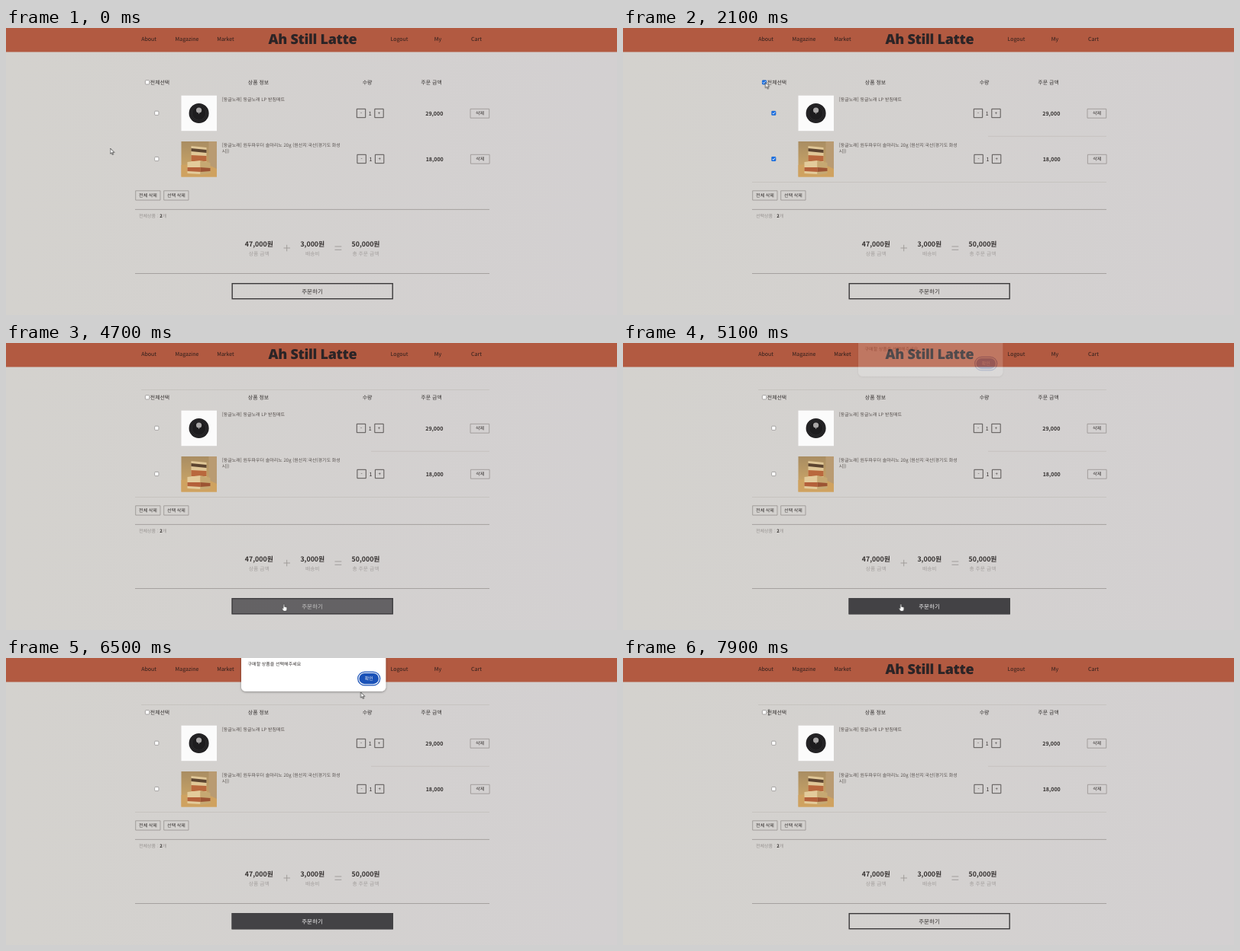
Write an HTML page that moves like this. It is 800x377 px and loops after 8000 ms.

```html
<!DOCTYPE html>
<html lang="ko">
<head>
<meta charset="utf-8">
<title>Cart</title>
<style>
html, body { margin: 0; width: 100%; height: 100%; overflow: hidden; background: #d4d1cf; }
svg { display: block; width: 800px; height: 377px; }
text {
  font: 400 6px "Noto Sans CJK KR", "Noto Sans CJK JP", "Noto Sans", sans-serif;
  fill: #34302f; text-rendering: geometricPrecision; white-space: pre;
}
.mid text, text.mid { text-anchor: middle; }
.nav text { font-size: 7px; fill: #2b1d1b; }
text.brand {
  font: 800 18px "Open Sans", Roboto, sans-serif;
  font-stretch: 75%; letter-spacing: -.3px; fill: #2b2426;
}
.head text { font-size: 6.9px; font-weight: 500; }
.name text { fill: #57514e; }
.price text { font-size: 7px; font-weight: 700; }
.sum text { font-size: 8.8px; font-weight: 700; }
.sub text { font-size: 6.8px; fill: #a39f9d; }
.count text { fill: #989492; }
.count .num { fill: #34302f; font-weight: 700; }
text.order { font-size: 7.5px; font-weight: 500; }
.white { fill: #f4f3f4 !important; }
.thin { fill: none; stroke: #9d9997; stroke-width: .9; }
.step { fill: none; stroke: #4b4746; stroke-width: .9; }

.checked, .picked, .all, .dark, .dialog, .cursor, .arrow, .hand, .beam, .rules, .top-rule {
  animation: 8s linear infinite;
}
.checked { animation-name: checked; animation-timing-function: step-end; }
.picked { animation-name: picked; animation-timing-function: step-end; }
.all { animation-name: all; animation-timing-function: step-end; }
.rules { animation-name: rules; animation-timing-function: step-end; }
.top-rule { animation-name: top-rule; animation-timing-function: step-end; }
.arrow { animation-name: arrow; animation-timing-function: step-end; }
.hand { animation-name: hand; animation-timing-function: step-end; }
.beam { animation-name: beam; animation-timing-function: step-end; }
.dark { animation-name: dark; animation-timing-function: ease; }
.dialog { animation-name: dialog; }
.cursor { animation-name: cursor; }

@keyframes checked { 0%, 38.75%, 100% { opacity: 0 } 20% { opacity: 1 } }
@keyframes picked { 0%, 50%, 100% { opacity: 0 } 20% { opacity: 1 } }
@keyframes all { 0%, 50%, 100% { opacity: 1 } 20% { opacity: 0 } }
@keyframes rules { 0% { opacity: 0 } 6%, 100% { opacity: 1 } }
@keyframes top-rule { 0% { opacity: 0 } 50%, 100% { opacity: 1 } }
@keyframes arrow { 0%, 67.5% { opacity: 1 } 57%, 97.25%, 100% { opacity: 0 } }
@keyframes hand { 0%, 67.5%, 100% { opacity: 0 } 57% { opacity: 1 } }
@keyframes beam { 0% { opacity: 0 } 97.25%, 100% { opacity: 1 } }
@keyframes dark { 0%, 57% { opacity: 0 } 60.75%, 87.8% { opacity: 1 } 91.5%, 100% { opacity: 0 } }
@keyframes dialog {
  0%, 63.5% { opacity: 0 }
  65%, 86.25% { opacity: 1 }
  87.5% { opacity: .3 }
  90% { opacity: .05 }
  91.25%, 100% { opacity: 0 }
}
@keyframes cursor {
  0%, 1.25% { transform: translate(136.5px, 158px); animation-timing-function: ease-in-out }
  11.25% { transform: translate(184px, 78px) }
  16.25%, 50% { transform: translate(186.5px, 71.5px); animation-timing-function: ease-in-out }
  57.5%, 66.9% { transform: translate(363.5px, 343px) }
  73.75% { transform: translate(425px, 128px) }
  81.25% { transform: translate(464.5px, 45px) }
  85%, 90.6% { transform: translate(480px, 28px); animation-timing-function: ease-in-out }
  96.25% { transform: translate(223px, 75px) }
  98.75%, 100% { transform: translate(191px, 71.5px) }
}
</style>
</head>
<body>
<svg viewBox="0 0 800 377" xmlns="http://www.w3.org/2000/svg">
  <defs>
    <linearGradient id="page"><stop stop-color="#d4d2ce"/><stop offset="1" stop-color="#d3d0d1"/></linearGradient>
    <linearGradient id="wall" x2="0" y2="1"><stop stop-color="#a98d62"/><stop offset="1" stop-color="#d3ab68"/></linearGradient>
    <filter id="shade" x="-10%" y="-20%" width="120%" height="150%">
      <feDropShadow dx="0" dy="1" stdDeviation="1.5" flood-opacity=".35"/>
    </filter>
    <rect id="box" x="-2.6" y="-2.6" width="5.2" height="5.2" rx=".9" fill="#fff" stroke="#7b7777" stroke-width=".6"/>
    <g id="tick">
      <rect x="-2.9" y="-2.9" width="5.8" height="5.8" rx="1" fill="#1b6fe0"/>
      <path d="M-1.7 0L-.5 1.3L1.8-1.4" fill="none" stroke="#fff" stroke-width=".9"/>
    </g>
    <g id="qty" class="mid">
      <path class="step" d="M459.3 106.3h11.4v11.4h-11.4zM482.8 106.3h11.4v11.4h-11.4z"/>
      <text x="465" y="114">-</text>
      <text x="476.8" y="114.5" style="font-size:7px">1</text>
      <text x="488.5" y="114">+</text>
    </g>
    <g id="remove" class="mid">
      <path class="thin" d="M608 106.3h24.7v11.9h-24.7z"/>
      <text x="620.4" y="114.4">삭제</text>
    </g>
  </defs>

  <rect width="800" height="377" fill="url(#page)"/>
  <rect width="800" height="31.5" fill="#b25a41"/>
  <g class="nav mid">
    <text x="187" y="17.4">About</text>
    <text x="237" y="17.4">Magazine</text>
    <text x="287.5" y="17.4">Market</text>
    <text x="515" y="17.4">Logout</text>
    <text x="565.5" y="17.4">My</text>
    <text x="616" y="17.4">Cart</text>
    <text class="brand" x="401.5" y="21.3">Ah Still Latte</text>
  </g>

  <g fill="none" stroke="#c3bfbc" stroke-width=".8">
    <path class="top-rule" d="M177 61.5H633"/>
    <path class="rules" d="M478 142.3H633M169 202.5H633"/>
  </g>
  <path d="M169 238.4H633M169 322.5H633" stroke="#a5a19f"/>

  <g class="head mid">
    <text x="201.5" y="74">전체선택</text>
    <text x="330.5" y="74">상품 정보</text>
    <text x="473" y="74">수량</text>
    <text x="557" y="74">주문 금액</text>
  </g>

  <rect x="229.5" y="88.7" width="46.5" height="46.5" fill="#fbfbfb"/>
  <g transform="translate(252.6 112)" fill="none" stroke="#3d3c3e" stroke-width=".5">
    <circle r="13" fill="#1d1c1e" stroke="none"/>
    <circle r="11.3"/><circle r="9.2"/>
    <circle cy="-4" r="3.6" fill="#a9a7a7" stroke="none"/>
    <circle r=".6" fill="#eee" stroke="none"/>
  </g>

  <g transform="translate(229.5 149)">
    <rect width="46.5" height="46.5" fill="url(#wall)"/>
    <path d="M0 31L46.500 27V46.500H0z" fill="#cfa260"/>
    <path d="M36 0h10.500v36l-10.500-5z" fill="#b99b72"/>
    <path d="M13 6L33 8V27H13z" fill="#e0c797"/>
    <path d="M13 9L33 11V15L13 13z" fill="#5c4430"/>
    <path d="M13 18L33 19V26H13z" fill="#b9683d"/>
    <path d="M8 27L25 25V43L8 42z" fill="#e3cb9b"/>
    <path d="M25 25L38 28V42L25 44z" fill="#c6a872"/>
    <path d="M8 34L25 34V40L8 39z" fill="#b4603a"/>
    <path d="M25 34L38 35V39L25 40z" fill="#9c5433"/>
  </g>

  <g class="name">
    <text x="282.700" y="95.500">[둥글노래] 둥글노래 LP 받침매트</text>
    <text x="282.700" y="155.700">[둥글노래] 원두파우더 솔마리노 20g (원산지:국산(경기도 화성</text>
    <text x="282.700" y="164">시))</text>
  </g>
  <use href="#qty"/><use href="#qty" x=".6" y="60"/>
  <use href="#remove"/><use href="#remove" x=".4" y="60"/>
  <g class="price mid">
    <text x="560.800" y="114.600">29,000</text>
    <text x="561.200" y="174.800">18,000</text>
  </g>

  <use href="#box" x="185" y="71.300"/>
  <use href="#box" x="197.300" y="111.800"/>
  <use href="#box" x="197.300" y="172"/>
  <g class="checked">
    <use href="#tick" x="185" y="71.300"/>
    <use href="#tick" x="197.300" y="111.800"/>
    <use href="#tick" x="197.300" y="172"/>
  </g>

  <path class="thin" d="M169.700 213.800h32.300v12.300h-32.300zM206.700 213.800h32.300v12.300h-32.300z"/>
  <g class="mid">
    <text x="186" y="222.300">전체 삭제</text>
    <text x="223" y="222.300">선택 삭제</text>
  </g>
  <g class="count">
    <text class="all" x="174" y="249.300">전체상품 : <tspan class="num">2</tspan>개</text>
    <text class="picked" x="174" y="249.300">선택상품 : <tspan class="num">2</tspan>개</text>
  </g>

  <g class="sum mid">
    <text x="331.300" y="286.600">47,000원</text>
    <text x="401.300" y="286.600">3,000원</text>
    <text x="471" y="286.600">50,000원</text>
  </g>
  <g class="sub mid">
    <text x="331.300" y="299">상품 금액</text>
    <text x="401.300" y="299">배송비</text>
    <text x="471" y="299">총 주문 금액</text>
  </g>
  <path d="M363.500 289h8.500M367.700 284.800v8.500M430.500 287h8.800M430.500 291.300h8.800" stroke="#a19d9b" stroke-width="1"/>

  <rect x="296.200" y="335.700" width="210" height="20" fill="none" stroke="#3b393a" stroke-width="1.400"/>
  <text class="order mid" x="401" y="348.500">주문하기</text>
  <g class="dark">
    <rect x="295.600" y="335.100" width="211.200" height="21.200" fill="#434245"/>
    <text class="order mid white" x="401" y="348.500">주문하기</text>
  </g>

  <g class="dialog">
    <rect x="308" y="-20" width="189.300" height="63.700" rx="5.500" fill="#fff" filter="url(#shade)"/>
    <text x="316.600" y="9.800">구매할 상품을 선택해주세요</text>
    <rect x="460.700" y="18.300" width="29" height="17.600" rx="8.800" fill="#fff" stroke="#1a52b8" stroke-width="1.200"/>
    <rect x="462.400" y="20" width="25.600" height="14.200" rx="7.100" fill="#1a52b8"/>
    <text class="mid white" x="475.200" y="29.300">확인</text>
  </g>

  <g class="cursor" stroke-linejoin="round">
    <path class="arrow" d="M0 0V7.300L1.700 5.800L2.900 8.500L4.100 8L2.900 5.300H5.200z" fill="#fff" stroke="#222" stroke-width=".7"/>
    <path class="hand" d="M-.6 .600Q.4-.4 1.100 .600V3.300L4.400 4.100V7L3.500 9.300H-.2L-2.400 5.600Q-2.300 4.500-.6 5.700z" fill="#fff" stroke="#222" stroke-width=".6"/>
    <path class="beam" d="M-1.200-3.500H1.200M0-3.500V3.500M-1.200 3.500H1.200" fill="none" stroke="#333" stroke-width=".6"/>
  </g>
</svg>
</body>
</html>
```
